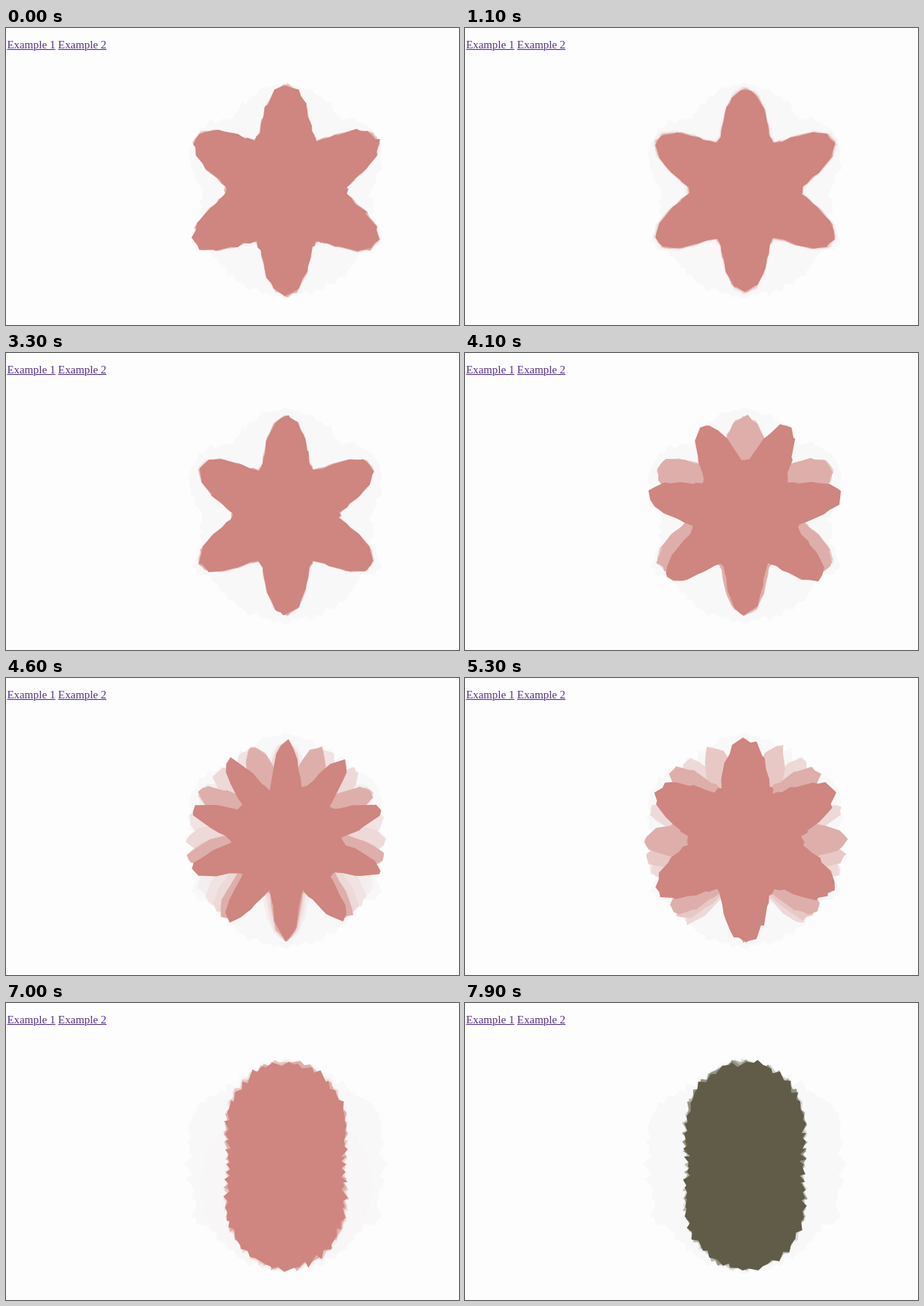
Recreate the animation shown at these times as an HTML page with a canvas. Size 600 px wide and 393 px high, loop 8000 ms.

```html
<!DOCTYPE html>
<html lang="en">
<head>
<meta charset="utf-8">
<title>Flower</title>
<style>
  html, body { margin: 0; width: 100%; height: 100%; overflow: hidden; background: #fefdfe; }
  canvas { position: absolute; left: 0; top: 0; }
  nav { position: absolute; left: 1.5px; top: 14px; font: 14.85px "Liberation Serif", "Times New Roman", serif; color: #563088; white-space: nowrap; }
  nav span { text-decoration: underline 1.4px #4f2a84; }
</style>
</head>
<body>
<canvas id="stage" width="600" height="393"></canvas>
<nav><span>Example 1</span> <span>Example 2</span></nav>
<script>
const W = 600, H = 393, CX = 371, CY = 215;
const LOOP = 8000, STEP = 100, TRAIL = 16, FADE = 0.35;
const PINK = '#cf8580', OLIVE = '#605c47', DUST = '#f8f8f8';

const stage = document.getElementById('stage').getContext('2d');
const layer = document.createElement('canvas');
layer.width = W;
layer.height = H;
const trail = layer.getContext('2d');

// [first step, petal count]
const petalSteps = [
  [-99, 6], [41, 7], [43, 8], [44, 9], [46, 10], [51, 9], [52, 8], [53, 6],
  [55, 3], [57, 2], [59, 1], [62, 2]
];
// [step, radius offset, roughness]
const poses = [
  [0, -1, 3], [11, -6, 1.8], [33, -9.5, 2.2], [46, -8, 2.5],
  [60, -2.5, 4.5], [70, -4, 4.5], [79, -3.5, 4.5]
];
const oldPetals = [1, 2, 3, 6];

function rnd(a, b) {
  const v = Math.sin(a * 127.1 + b * 311.7 + 17.3) * 43758.5453;
  return (v - Math.floor(v)) * 2 - 1;
}

function petalsAt(step) {
  let n = 6;
  for (const [from, count] of petalSteps) if (step >= from) n = count;
  return n;
}

function poseAt(step) {
  const s = Math.max(0, Math.min(79, step));
  let k = 0;
  while (k < poses.length - 2 && s > poses[k + 1][0]) k++;
  const a = poses[k], b = poses[k + 1];
  const u = (s - a[0]) / (b[0] - a[0]);
  return { offset: a[1] + (b[1] - a[1]) * u, rough: a[2] + (b[2] - a[2]) * u };
}

// Alternating out and in points with random depth and lean give a torn edge.
function fillFlower(ctx, n, offset, rough, seed, color) {
  const count = 104;
  ctx.beginPath();
  for (let i = 0; i < count; i++) {
    const lean = 0.45 * rnd(i + 300, seed);
    const a = (i + lean) / count * Math.PI * 2; // measured from straight down
    const side = i % 2 ? -1 : 1;
    const spike = rough * (side * 0.5 + 0.7 * rnd(i, seed));
    const r = 110 + offset + 30 * Math.cos(n * a) + spike;
    ctx.lineTo(CX + r * Math.sin(a), CY + r * Math.cos(a));
  }
  ctx.closePath();
  ctx.fillStyle = color;
  ctx.fill();
}

function drawDust(step) {
  const seen = new Set(oldPetals);
  for (const [from, count] of petalSteps) if (step >= from) seen.add(count);
  for (const n of seen) {
    fillFlower(stage, n, oldPetals.includes(n) ? 0 : -7, 4, 500 + n, DUST);
  }
}

function drawTrail(step) {
  trail.clearRect(0, 0, W, H);
  for (let s = step - TRAIL; s <= step; s++) {
    trail.globalCompositeOperation = 'destination-out';
    trail.fillStyle = `rgba(0,0,0,${FADE})`;
    trail.fillRect(0, 0, W, H);
    trail.globalCompositeOperation = 'source-over';
    const { offset, rough } = poseAt(s);
    fillFlower(trail, petalsAt(s), offset, rough, s, s >= 74 ? OLIVE : PINK);
  }
}

let last = -1;
function tick(now) {
  const step = Math.floor(now % LOOP / STEP);
  if (step !== last) {
    last = step;
    stage.clearRect(0, 0, W, H);
    drawDust(step);
    drawTrail(step);
    stage.drawImage(layer, 0, 0);
  }
  requestAnimationFrame(tick);
}
tick(0);
</script>
</body>
</html>
```
